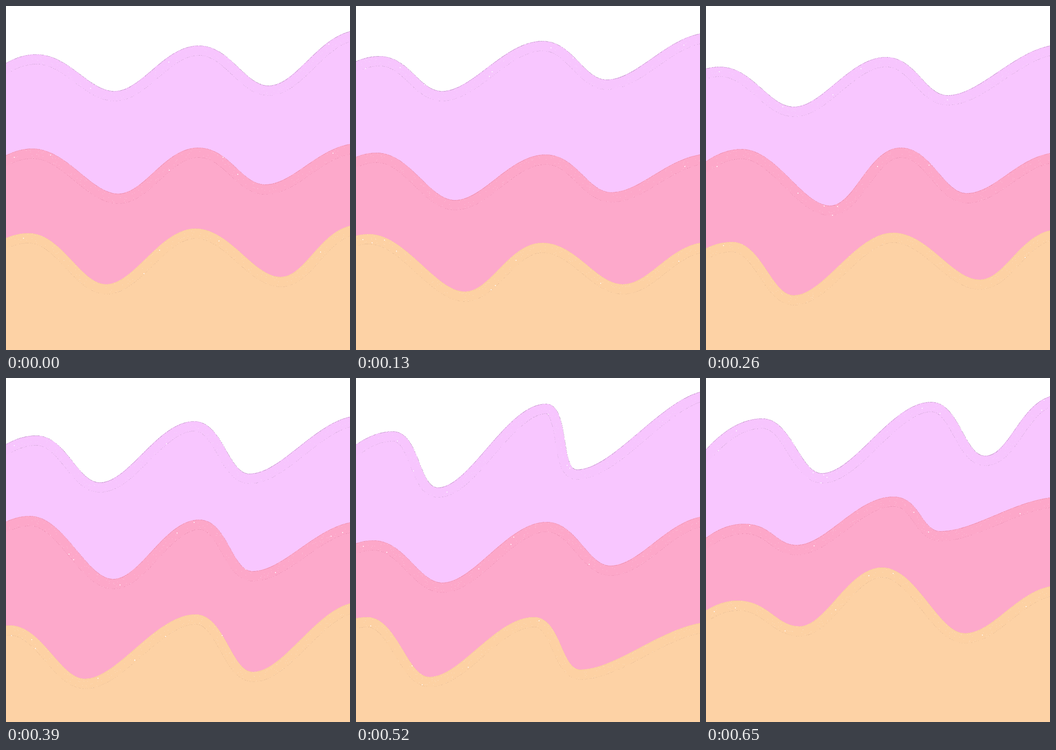
Recreate the animation shown at these times as an HTML page with a canvas. Size 748 px wide and 748 px high, loop 780 ms.

```html
<!DOCTYPE html>
<html>
<head>
<meta charset="utf-8">
<style>
html, body { margin: 0; width: 100%; height: 100%; overflow: hidden; background: #fff }
canvas { display: block }
</style>
</head>
<body>
<canvas id="stage" width="748" height="748"></canvas>
<script>
const SIZE = 748, HOLD = 130, POSES = 6, BAND = 21;
const ctx = document.getElementById('stage').getContext('2d');

// A pose is crest, trough, crest, trough (x, y each), then the height at the right edge
const waves = [
  { fill: '#f8c6ff', band: '#f7c5fe', dot: '#9d84a6', edge: 0.6, poses: [
    [65, 105, 236, 185, 419, 86, 571, 173, 55],
    [50, 109, 187, 185, 405, 76, 545, 160, 60],
    [30, 132, 191, 219, 391, 111, 525, 194, 86],
    [65, 125, 204, 227, 409, 94, 529, 208, 84],
    [80, 116, 178, 238, 413, 56, 480, 199, 30],
    [122, 88, 252, 207, 489, 52, 607, 169, 40]
  ] },
  { fill: '#fda9cb', band: '#fda7c9', dot: '#cf6f92', edge: 0.4, poses: [
    [57, 310, 244, 408, 418, 308, 563, 388, 300],
    [45, 319, 215, 422, 412, 323, 555, 405, 323],
    [77, 311, 270, 434, 423, 308, 567, 407, 320],
    [52, 300, 233, 437, 420, 308, 536, 420, 314],
    [38, 353, 188, 445, 414, 313, 553, 408, 302],
    [82, 317, 197, 363, 407, 258, 510, 333, 260]
  ] },
  { fill: '#fdd2a5', band: '#fdd1a3', dot: '#c9a080', edge: 0.15, poses: [
    [49, 494, 218, 605, 412, 484, 597, 589, 478],
    [28, 496, 237, 621, 405, 515, 580, 605, 515],
    [56, 513, 191, 629, 407, 493, 595, 595, 488],
    [8, 538, 172, 654, 412, 514, 537, 639, 490],
    [24, 520, 160, 650, 387, 520, 488, 634, 533],
    [69, 484, 203, 540, 383, 412, 563, 555, 453]
  ] }
];

function randomFrom(seed) {
  return () => (seed = (seed * 16807) % 2147483647) / 2147483647;
}

// Cubic segments as [x0, y0, x1, y1, x2, y2, x3, y3]; crests are rounder than troughs
function segments(pose) {
  const [x, y] = pose, rise = 0.0045 * x * x;
  const list = [[0, y + rise, x / 3, y + rise / 3, x * 2 / 3, y, x, y]];
  for (let i = 0; i < 4; i++) {
    const last = i === 3;
    const [xa, ya] = pose.slice(i * 2);
    const [xb, yb] = last ? [SIZE, pose[8]] : pose.slice(i * 2 + 2);
    const handle = 30 + 0.2 * (xb - xa);
    const lean = i % 2 ? -8 : 8;
    const drop = last ? 0.15 * (ya - yb) : 0;
    list.push([xa, ya, xa + handle + lean, ya, xb - handle + lean, yb + drop, xb, yb]);
  }
  return list;
}

// Visits the curve about once per pixel with the inward normal
function walk(segs, visit) {
  for (const [x0, y0, x1, y1, x2, y2, x3, y3] of segs) {
    const steps = Math.ceil(Math.hypot(x3 - x0, y3 - y0));
    for (let i = 0; i < steps; i++) {
      const t = (i + 0.5) / steps, u = 1 - t;
      const at = (a, b, c, d) => u * u * u * a + 3 * u * u * t * b + 3 * u * t * t * c + t * t * t * d;
      const slope = (a, b, c, d) => u * u * (b - a) + 2 * u * t * (c - b) + t * t * (d - c);
      const dx = slope(x0, x1, x2, x3), dy = slope(y0, y1, y2, y3), len = Math.hypot(dx, dy) || 1;
      visit(at(x0, x1, x2, x3), at(y0, y1, y2, y3), -dy / len, dx / len);
    }
  }
}

function drawWave(wave, pose, seed) {
  const segs = segments(wave.poses[pose]), rand = randomFrom(seed);
  const line = new Path2D();
  line.moveTo(0, segs[0][1]);
  for (const s of segs) line.bezierCurveTo(...s.slice(2));
  const body = new Path2D(line);
  body.lineTo(SIZE, SIZE);
  body.lineTo(0, SIZE);
  body.closePath();

  ctx.fillStyle = wave.fill;
  ctx.fill(body);
  ctx.save();
  ctx.clip(body);
  ctx.strokeStyle = wave.band;
  ctx.lineWidth = BAND * 2;
  ctx.lineCap = 'square';
  ctx.stroke(line);
  ctx.restore();

  const speck = (color, alpha, x, y, size = 1) => {
    ctx.globalAlpha = alpha;
    ctx.fillStyle = color;
    ctx.fillRect(Math.round(x), Math.round(y), size, size);
  };
  walk(segs, (x, y, nx, ny) => {
    const depth = rand() * BAND;
    if (rand() < 0.6) speck(wave.dot, wave.edge, x, y);
    if (rand() < 0.3) speck(wave.dot, 0.4, x + nx * BAND, y + ny * BAND);
    if (rand() < 0.2) speck('#fff', 0.4, x + nx * depth, y + ny * depth);
    if (rand() < 0.006) speck('#fff', 0.9, x + nx * depth, y + ny * depth, 2);
  });
  ctx.globalAlpha = 1;
}

let shown = -1;
function tick() {
  const pose = Math.floor(performance.now() / HOLD) % POSES;
  if (pose !== shown) {
    shown = pose;
    ctx.fillStyle = '#fff';
    ctx.fillRect(0, 0, SIZE, SIZE);
    waves.forEach((wave, i) => drawWave(wave, pose, 9173 * (pose * 3 + i + 1)));
  }
  requestAnimationFrame(tick);
}
tick();
</script>
</body>
</html>
```
